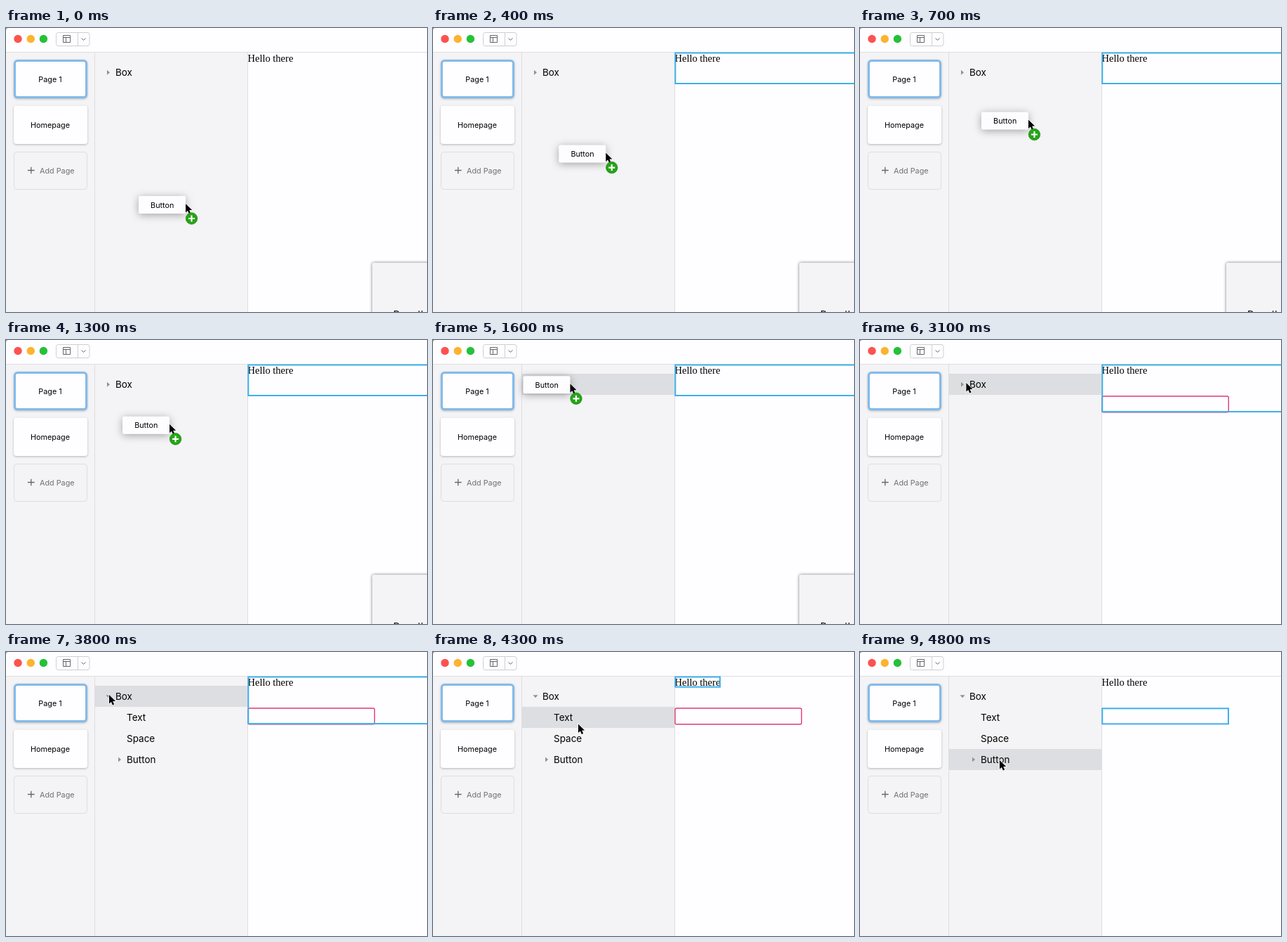
Write an HTML page that moves like this. It is 600 px wide and 404 px high and loops after 5000 ms.

```html
<!DOCTYPE html>
<html lang="en">
<head>
<meta charset="utf-8">
<title>Dragging a button into a box</title>
<style>
html, body { margin: 0; width: 100%; height: 100%; overflow: hidden; }
svg { display: block; width: 600px; height: 404px; font-family: Inter, sans-serif; }
.small { font-size: 10.8px; }
.tree { font-size: 13.5px; }
.mid { text-anchor: middle; }
.line { fill: none; stroke: #deddE0; }
.icon { fill: none; stroke: #68676b; }
.card { fill: #fefdff; filter: drop-shadow(0 1px 1.5px #0004); }
.ghost { fill: #fdfcfe; filter: drop-shadow(0 2px 6px #0005); }
.panel { fill: #f4f3f5; filter: drop-shadow(0 0 2px #0008); }
</style>
</head>
<body>
<svg viewBox="0 0 600 404">
  <rect width="600" height="404" fill="#fefdff"/>
  <rect y="34" width="344" height="370" fill="#f4f3f5"/>
  <rect id="row" x="127" width="217" height="30" fill="#dddee2"/>
  <path class="line" d="M0 34.5H600M126.5 34V404M344.5 34V404"/>
  <path d="M0 0h2L0 2z" fill="#888"/>

  <circle cx="17" cy="15.5" r="5.7" fill="#fd5250"/>
  <circle cx="35.3" cy="15.5" r="5.7" fill="#fdb32f"/>
  <circle cx="53.4" cy="15.5" r="5.7" fill="#25c138"/>
  <rect x="71.5" y="6.5" width="47.5" height="19" rx="3" fill="#fefdff" stroke="#cfced1"/>
  <path d="M102.5 7V25" stroke="#cfced1"/>
  <path class="icon" d="M81.5 10.5h10v10h-10zM81.5 13.5h10M85.5 13.5v7"/>
  <path class="icon" d="M107.5 14.5l3 3 3-3"/>

  <rect class="card" x="12.5" y="46.5" width="102" height="52" rx="4" stroke="#83bbea" stroke-width="3"/>
  <rect class="card" x="11" y="110.5" width="105" height="54.5" rx="4"/>
  <rect class="line" x="11.5" y="176.5" width="104" height="53" rx="4"/>
  <g class="small">
    <text class="mid" x="63" y="77">Page 1</text>
    <text class="mid" x="63" y="142.4">Homepage</text>
    <text x="48" y="206.8" fill="#717074">Add Page</text>
  </g>
  <path d="M31 202.5h9.6M35.8 197.7v9.6" stroke="#68676b" stroke-width="1.3"/>

  <g class="tree">
    <path id="twist" d="M-2-3.5v7l4-3.5z" fill="#929195"/>
    <text x="156" y="68">Box</text>
    <g id="children">
      <text x="172" y="98">Text</text>
      <text x="172" y="128">Space</text>
      <text x="172" y="158">Button</text>
      <path d="M160 149.5v7l4-3.5z" fill="#929195"/>
    </g>
  </g>

  <text x="344.5" y="47.5" font-size="14.5" font-family="'Liberation Serif', serif">Hello there</text>
  <rect id="pink" x="345" y="80" width="180.3" height="22.8" rx="2" fill="none" stroke="#e23a72" stroke-width="1.4"/>
  <rect id="blue" x="345.3" fill="none" stroke="#3fb0ea" stroke-width="2"/>
  <g id="panel">
    <rect class="panel" x="522" y="334" width="100" height="90" rx="2"/>
    <text class="tree" x="552" y="412">Drop the</text>
  </g>

  <g id="ghost">
    <rect class="ghost" x="-67" y="-11" width="67" height="25" rx="2.5"/>
    <text class="small mid" x="-33.3" y="5.6">Button</text>
  </g>
  <g id="cursor">
    <path d="M0 0v12.5l2.9-2.6 2 4.5 2.3-1-2-4.4h4z" stroke="#fff" stroke-width="1.4" paint-order="stroke"/>
    <g id="badge" transform="translate(8.5 21)">
      <circle r="8.3" fill="#25a417" stroke="#1b8510" stroke-width=".6"/>
      <path d="M-4.5 0h9M0-4.5v9" stroke="#fff" stroke-width="2.2"/>
    </g>
  </g>
</svg>
<script>
const LOOP = 5000, STEP = 100;
// Pointer path: time, x, y
const path = [
  [0, 256, 250], [700, 240, 130.5], [1200, 240, 130.5], [1600, 195.5, 62.3], [1900, 189, 62],
  [2700, 189, 62], [3200, 147, 61], [3900, 147, 61], [4300, 207, 102.5],
  [4500, 203, 141], [4800, 199, 154], [LOOP, 199, 154]
];
// Outline for each tree row: y, width, height
const outlines = [[35.5, 300, 43.5], [35.5, 63.7, 14.2], [50, 300, 29.5], [80.3, 179.7, 22]];

const el = id => document.getElementById(id);
const set = (id, attrs) => {
  for (const name in attrs) el(id).setAttribute(name, attrs[name]);
};
const clamp = v => Math.max(0, Math.min(1, v));

function pointer(t) {
  const i = path.findIndex(p => p[0] > t);
  const [t0, x0, y0] = path[i - 1], [t1, x1, y1] = path[i];
  const u = (t - t0) / (t1 - t0), k = u * u * (3 - 2 * u);
  return [x0 + (x1 - x0) * k, y0 + (y1 - y0) * k];
}

function draw(now) {
  const t = Math.floor(now % LOOP / STEP) * STEP;
  const [x, y] = pointer(t);
  const dragging = t < 2100, dropped = t >= 2400;
  const open = clamp((t - 3300) / 300);
  const row = dragging ? (y < 78 ? 0 : -1) : Math.floor((y - 48) / 30);
  const [top, width, height] = outlines[Math.max(row, 0)];
  const at = `translate(${x} ${y})`;

  set('row', { y: 48 + row * 30, opacity: +(row >= 0) });
  set('blue', {
    y: top, width,
    height: row === 0 && dropped ? 66.5 : height,
    opacity: +(!dragging || y < 190)
  });
  set('pink', { opacity: +(dropped && row !== 3) });
  set('panel', { opacity: dragging ? 1 : t < 2200 ? 0.6 : dropped ? 0 : 0.25 });
  set('twist', { transform: `translate(146 63.3) rotate(${90 * open})` });
  set('children', { opacity: open });
  set('ghost', { transform: at, opacity: dragging ? 1 : t < 2200 ? 0.4 : 0 });
  set('cursor', { transform: at });
  set('badge', { opacity: +dragging });
}

function tick() {
  draw(performance.now());
  requestAnimationFrame(tick);
}
tick();
</script>
</body>
</html>
```
